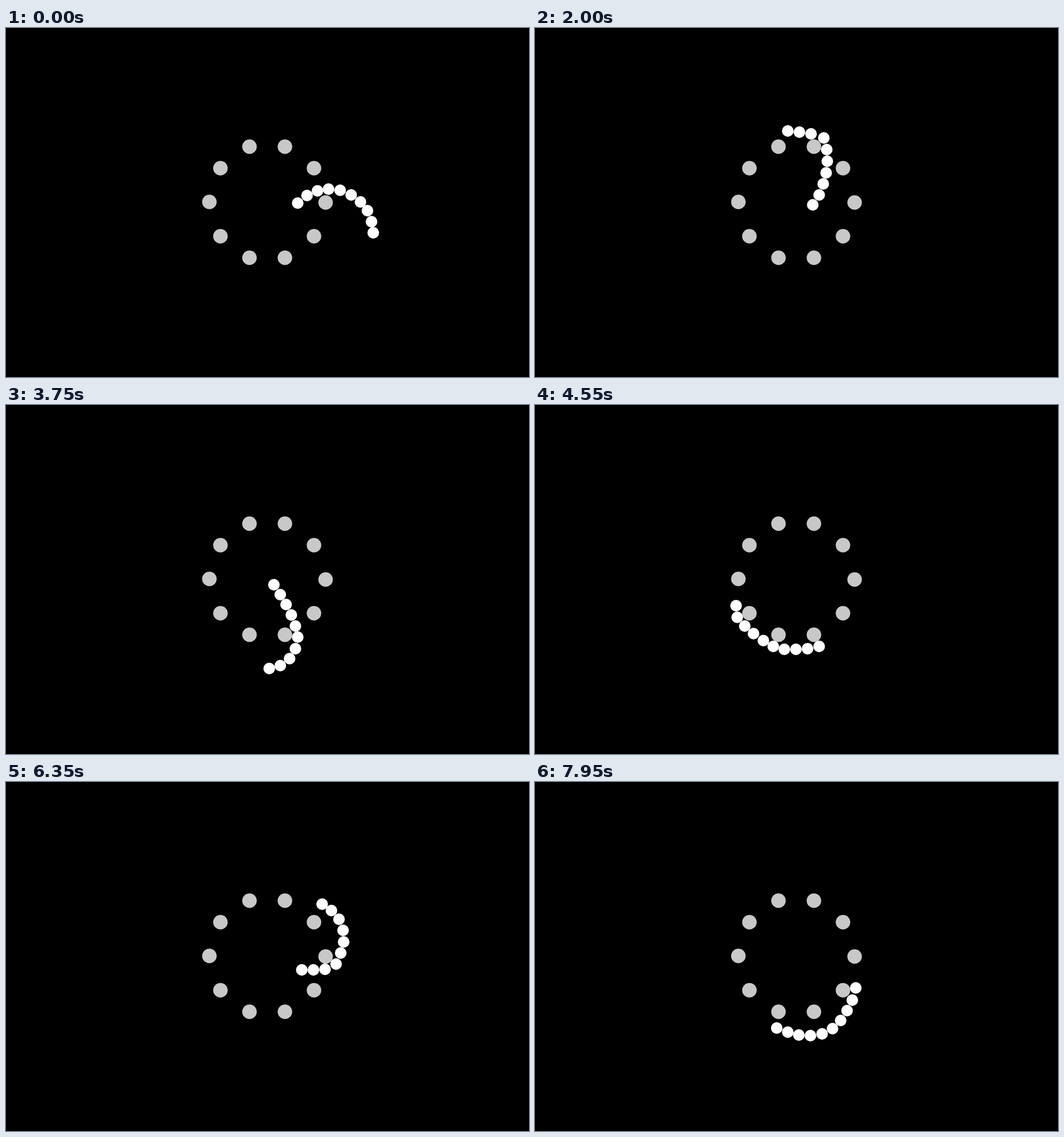
These frames come from a looping animation (900 by 600 pixels, 8 s). An HTML page with a canvas:

```html
<!DOCTYPE html>
<html lang="en">
<head>
<meta charset="utf-8">
<title>Chain weaving through a ring</title>
<style>
  html, body { margin: 0; width: 100%; height: 100%; overflow: hidden; background: #000; }
  canvas { display: block; }
</style>
</head>
<body>
<canvas id="stage" width="900" height="600"></canvas>
<script>
const LOOP = 8000, STEP = 50;
const LINKS = 10, SPACING = 20, BEAD = 10, POST = 12.5, CLEARANCE = 22.5;
const ctx = document.getElementById('stage').getContext('2d');

const polar = (center, radius, degrees) => ({
  x: center.x + radius * Math.cos(degrees * Math.PI / 180),
  y: center.y + radius * Math.sin(degrees * Math.PI / 180)
});

const posts = Array.from({ length: 10 }, (_, i) => ({
  x: Math.trunc(450 + 100 * Math.cos(i * 0.6283)),
  y: Math.trunc(300 - 100 * Math.sin(i * 0.6283))
}));

// Speed in px per ms: the leader slows down towards the middle of the loop
const pace = time => 0.17 + 0.28 * (time / 4700 - 1) ** 2;

const pass = (time, x, y) => [{ time, x, y }];

// A spiral turn about a post, as way points spaced evenly in time
function around(post, start, fromAngle, toAngle, fromRadius, toRadius) {
  const sweep = Math.abs(toAngle - fromAngle) * Math.PI / 180;
  const duration = sweep * (fromRadius + toRadius) / 2 / pace(start);
  return [0, 0.25, 0.5, 0.75, 1].map(u => ({
    time: start + u * duration,
    ...polar(posts[post],
      fromRadius + u * (toRadius - fromRadius),
      fromAngle + u * (toAngle - fromAngle))
  }));
}

const route = [
  pass(0, 503, 302),
  around(8, 195, -34, 100, 26, 47),
  around(7, 435, 72, 249, 44, 48),
  pass(1050, 480, 324),
  around(1, 1380, 83, 204, 31, 27),
  around(2, 1700, 7, -110, 26, 26),
  around(3, 2090, -109, -250, 28, 44),
  pass(2950, 485, 338),
  around(8, 3174, -22, 95, 34, 58),
  around(6, 4300, 115, 275, 23, 29),
  around(0, 5425, 61, -1, 25, 44),
  pass(5950, 606, 265),
  around(1, 6290, -45, -195, 36, 29),
  pass(7050, 529, 336),
  around(9, 7165, -45, 45, 25, 55),
  pass(7680, 508, 454),
  pass(7950, 416, 423)
].flat();

const slope = (i, axis) =>
  (route[i + 1][axis] - route[i][axis]) / (route[i + 1].time - route[i].time);

function tangent(i, axis) {
  if (i === 0) return slope(0, axis);
  if (i === route.length - 1) return slope(i - 1, axis);
  const before = route[i].time - route[i - 1].time;
  const after = route[i + 1].time - route[i].time;
  return (slope(i - 1, axis) * after + slope(i, axis) * before) / (before + after);
}

// Cubic Hermite curve through the way points
function leaderAt(time) {
  let i = 0;
  while (i < route.length - 2 && time > route[i + 1].time) i++;
  const span = route[i + 1].time - route[i].time;
  const u = (time - route[i].time) / span;
  const along = axis =>
    (1 + 2 * u) * (1 - u) ** 2 * route[i][axis] +
    u * (1 - u) ** 2 * span * tangent(i, axis) +
    u * u * (3 - 2 * u) * route[i + 1][axis] +
    u * u * (u - 1) * span * tangent(i + 1, axis);
  return { x: along('x'), y: along('y') };
}

function atDistance(point, anchor, distance) {
  const dx = point.x - anchor.x, dy = point.y - anchor.y;
  const scale = distance / (Math.hypot(dx, dy) || 1);
  return { x: anchor.x + dx * scale, y: anchor.y + dy * scale };
}

function clearOfPosts(point) {
  for (const post of posts) {
    if (Math.hypot(point.x - post.x, point.y - post.y) < CLEARANCE) {
      point = atDistance(point, post, CLEARANCE);
    }
  }
  return point;
}

// Each bead is dragged by the one before it and slides around the posts
function advance(chain, time) {
  const next = [clearOfPosts(leaderAt(time))];
  for (let i = 1; i < LINKS; i++) {
    next.push(clearOfPosts(atDistance(chain[i], next[i - 1], SPACING)));
  }
  return next;
}

// The chain starts out lying on a circular arc
const poses = [
  Array.from({ length: LINKS }, (_, i) => polar({ x: 557, y: 352 }, 75, 15.25 * i - 137))
];
for (let time = STEP; time < LOOP; time += STEP) {
  poses.push(advance(poses[poses.length - 1], time));
}

function dots(points, radius, color) {
  ctx.fillStyle = color;
  for (const { x, y } of points) {
    ctx.beginPath();
    ctx.arc(Math.round(x), Math.round(y), radius, 0, 2 * Math.PI);
    ctx.fill();
  }
}

function draw() {
  const pose = poses[Math.floor(performance.now() % LOOP / STEP)];
  ctx.fillStyle = '#000';
  ctx.fillRect(0, 0, 900, 600);
  dots(posts, POST, '#c8c8c8');
  dots(pose, BEAD, '#fff');
  requestAnimationFrame(draw);
}
draw();
</script>
</body>
</html>
```
